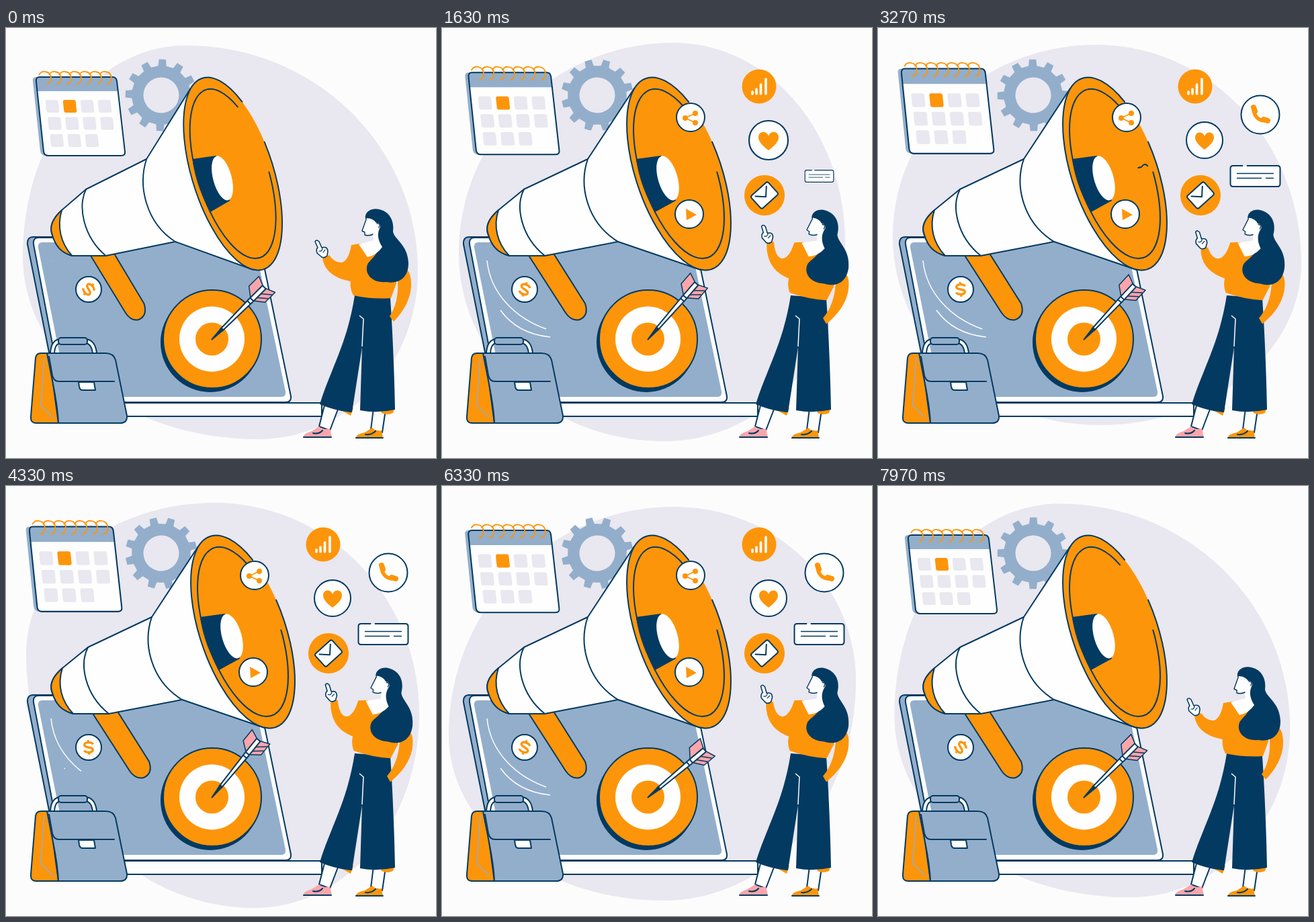
An HTML page for the animation above (8.01 s loop, 640 px wide and 640 px high).

```html
<!DOCTYPE html>
<html lang="en">
<head>
<meta charset="utf-8">
<title>Marketing loop</title>
<style>
html, body { margin: 0; width: 100%; height: 100%; overflow: hidden; background: #fcfcfc; }
svg { display: block; width: 100vw; height: 100vh; }
.o { fill: #fd950a; } .g { fill: #93aecb; } .w { fill: #fefefe; }
.d { fill: #033a61; } .b { fill: #e9e7ef; } .p { fill: #fba5ab; }
.s { stroke: #033a61; stroke-width: 2; stroke-linejoin: round; stroke-linecap: round; }
.so { stroke: #fd950a; stroke-width: 1.8; } .sw { stroke: #fefefe; stroke-width: 1.5; }
.n { fill: none; }
</style>
</head>
<body>
<svg id="stage" viewBox="0 0 640 640"></svg>
<script>
const LOOP = 8.01;
const path = (cls, d, more = '') => `<path class="${cls}" d="${d}" ${more}/>`;
const disc = (cls, x, y, r) => `<circle class="${cls}" cx="${x}" cy="${y}" r="${r}"/>`;
const group = (id, body) => `<g id="${id}">${body}</g>`;
const range = (n, f) => Array.from({ length: n }, (_, i) => f(i)).join('');

// Arc of the tilted megaphone mouth, angles in degrees
function mouthArc(rx, ry, from, to) {
  const tilt = -19 * Math.PI / 180;
  const at = a => {
    const x = rx * Math.cos(a * Math.PI / 180), y = ry * Math.sin(a * Math.PI / 180);
    return (352.5 + x * Math.cos(tilt) - y * Math.sin(tilt)) + ' ' + (217 + x * Math.sin(tilt) + y * Math.cos(tilt));
  };
  return `M${at(from)}A${rx} ${ry} -19 ${to - from > 180 ? 1 : 0} 1 ${at(to)}`;
}

function gearPath() {
  const pts = [];
  for (let i = 0; i < 12; i++)
    for (const [da, r] of [[-8, 44], [-5.5, 53.5], [5.5, 53.5], [8, 44]]) {
      const a = (i * 30 - 88 + da) * Math.PI / 180;
      pts.push((r * Math.cos(a)).toFixed(1) + ' ' + (r * Math.sin(a)).toFixed(1));
    }
  return 'M' + pts.join('L') + 'ZM26.5 0A26.5 26.5 0 1 0 -26.5 0A26.5 26.5 0 1 0 26.5 0Z';
}

const page = 'M50 73H159Q164 73 165 79L177 184Q178 190 171 190H63Q57 190 56 184L45 80Q44 73 50 73Z';
const calendar =
  path('g', 'M45 73Q39 73 40 79L51 183Q52 190 59 190H80V73Z') +
  path('w', page) +
  path('g', 'M50 73H159Q164 73 165 79L167 94H47L45 80Q44 73 50 73Z') +
  path('s n', page) +
  range(7, i => path('so n', `M${49 + 15 * i} 70q3 -6 9 -5q9 1 9 10q0 7 -7 9`)) +
  range(11, i => {
    const row = i >> 2, col = i & 3;
    return `<rect class="${i === 1 ? 'o' : 'b'}" x="-9.5" y="-9.5" width="19" height="19" rx="3"
      transform="translate(${69 + 26 * col + 3.4 * row} ${116.5 + 25.5 * row}) skewX(6)"/>`;
  });

const laptop =
  path('g s', 'M41 311Q31 311 32 322L77 548Q79 557 88 557H120V311Z') +
  path('w s', 'M48 312H366Q375 312 377 320L424 548Q425 557 416 557H94Q86 557 84 549L41 322Q40 312 48 312Z') +
  path('g', 'M54 319H362Q369 319 371 327L416 541Q417 549 409 549H100Q93 549 91 542L48 327Q47 319 54 319Z') +
  path('w s', 'M150 558H470V578H150Z');

const megaphone =
  path('o s', 'M128 337L184 424Q193 437 205 434Q219 428 213 410L165 334Z') +
  path('w s', 'M286 90L217 195L122 240L84 271C70 283 64 296 69 308C74 324 82 334 100 339L153 339L262 318L385 360L352 217Z') +
  path('o s', 'M84 271C70 283 64 296 69 308C74 324 82 334 100 339C82 320 76 295 84 271Z') +
  path('s n', 'M122 240C109 265 117 310 153 339M217 195C203 235 216 290 262 318') +
  '<ellipse class="o" cx="352.5" cy="217" rx="63.5" ry="150.2" transform="rotate(-19 352.5 217)"/>' +
  path('s n', mouthArc(63.5, 150.2, -11, 320)) +
  path('s n', mouthArc(55, 132, 7, 316)) +
  path('d', 'M289 195L326 190L348 257L317 274C302 248 292 220 289 195Z') +
  '<ellipse class="w" cx="336" cy="223.5" rx="14.5" ry="34" transform="rotate(-16 336 223.5)"/>';

const target =
  disc('d', 304, 468, 74) + disc('o s', 307, 463, 73) +
  disc('w', 306.5, 463, 48.5) + disc('o', 306.5, 463, 24.5);

const arrow =
  path('p s', 'M82 0L95 -17L116 -17L109 0L116 17L95 17Z', 'style="stroke-width:1.5"') +
  path('s n', 'M90 2L102 16M98 2L110 16', 'style="stroke-width:1.5"') +
  path('w s', 'M20 -2L82 -3.5H110V3.5H82L20 2Z') +
  path('d s', 'M0 0L22 -2V2Z') + path('s n', 'M78 -3V3M84 -3V3');

const strap = 'M69 484Q70 466 82 466H117Q130 466 132 484';
const briefcase =
  path('s n', strap, 'style="stroke-width:8"') +
  path('n', strap, 'stroke="#fefefe" stroke-width="4"') +
  '<rect class="g s" x="78" y="461" width="43" height="10" rx="4"/>' +
  path('o s', 'M52 484Q45 484 44 491L37 578Q36 588 45 588H78L64 484Z') +
  path('n', 'M57 490L52 562L70 580', 'stroke="#93aecb" stroke-width="1.5"') +
  path('g s', 'M61 484H148Q160 484 163 494L180 577Q181 588 170 588H78Q77 565 70 530Z') +
  path('s n', 'M64 489L69 517Q71 526 79 526H161') +
  path('w s', 'M108 527H131L133 539H114Q110 539 109 534Z');

const legs =
  path('w s', 'M475 558L466 593L482 599L495 565Z') + path('w s', 'M547 566L543 598L560 602L565 568Z') +
  path('p', 'M442 609Q444 603 455 600L466 593Q472 599 482 596L485 609Z') +
  path('o', 'M520 610Q522 604 534 602L545 595Q551 601 559 599L561 610Z') +
  path('s n', 'M443 609H484M521 610H561M457 603Q466 605 471 599M535 605Q544 606 550 600') +
  path('o', 'M490 564L513 577L517 565ZM556 565L579 564L576 573Q567 577 559 573Z') +
  path('d', 'M519 398L572 402C576 460 578 520 579 568Q552 574 527 569L530 475L515 572Q490 570 467 560C482 510 508 470 519 398Z') +
  path('sw n', 'M526 428L532 433L530 474');

const torso =
  path('o', 'M580 358Q604 350 603 385Q601 412 577 437L571 429Q585 408 583 376Z') +
  path('o', 'M514 323L526 321L562 324L580 345L581 380L573 402Q545 404 517 398Q510 386 514 370Z') +
  path('o', '', 'id="arm"') +
  path('d', 'M535 284C533 273 545 267 556 270C573 274 578 290 576 303C578 315 598 322 599 350C599 374 582 381 566 378C545 380 533 366 538 352C543 343 555 338 553 322L552 291Q542 290 535 284Z') +
  path('w', 'M537 283L530 302L534 304V308Q540 310 546 307L547 316L525 322L538 341Q552 338 560 326C553 315 552 306 557 296Q557 289 551 290Q546 283 537 283Z') +
  path('s n', 'M536 285L530 302L534 304V308Q540 310 546 307M552 291Q558 290 555 297', 'style="stroke-width:1.4"') +
  group('hand', path('w s', 'M470 341L463 335Q461 329 464 327L460 318Q462 314 466 318L470 327Q478 324 479 332L478 339Q474 343 470 341Z', 'style="stroke-width:1.6"') +
    path('s n', 'M466 332Q471 333 471 327M472 334L475 330', 'style="stroke-width:1.2"'));

// Icons are drawn around their own centre: x, y, start time, pop duration, body
const icons = [
  [472, 87, 1, .5, disc('o', 0, 0, 25.5) +
    path('n', 'M-10 8V11M-4 4V11M2.5 -3V11M10 -11V11', 'stroke="#fefefe" stroke-width="3.6" stroke-linecap="round"')],
  [486, 167, 1.2, .6, disc('w s', 0, 0, 27) +
    path('o', 'M0 14C-8 8 -14 2 -14 -4C-14 -13 -3 -14 0 -6C3 -14 14 -13 14 -4C14 2 8 8 0 14Z')],
  [480, 249, .98, .5, disc('o', 0, 0, 30) +
    '<g transform="rotate(-42)"><rect class="w s" x="-17" y="-12.5" width="34" height="25" rx="3"/>' +
    path('s n', 'M-11 -8L0 3L11 -8') + '</g>'],
  [561.5, 220.5, 1.54, .6, path('w', 'M-37 -15.5H37V15.5H-37Z') +
    path('s n', 'M-12 -15.5H33Q37 -15.5 37 -11.5V11.5Q37 15.5 33 15.5H-33Q-37 15.5 -37 11.5V-11.5Q-37 -15.5 -33 -15.5H-19') +
    path('s n', 'M-27 -4H27M-27 3H9M16 3H27', 'style="stroke-width:1.4"')],
  [569, 129, 1.75, .6, disc('w s', 0, 0, 28.5) +
    path('n', 'M-10 -10C-10 3 -2 10 10 9', 'stroke="#fd950a" stroke-width="5.5"') +
    path('n', 'M-10 -11L-8 -5M5 7L11 9', 'stroke="#fd950a" stroke-width="8" stroke-linecap="round"')],
  [370, 133, 0, 0, disc('w s', 0, 0, 21) + path('so n', 'M7 -6L-8 1L7 8') +
    disc('o', 7, -6, 4) + disc('o', -8, 1, 4) + disc('o', 7, 8, 4)],
  [368, 277, 0, 0, disc('w s', 0, 0, 21) + path('o', 'M-5 -8L11 1L-4 9Z')]
];

const ray = (id, cls, d) => path(cls + ' n', d, `id="${id}" pathLength="1" style="stroke-linecap:butt"`);

const stage = document.getElementById('stage');
stage.innerHTML =
  path('b', '', 'id="blob"') + path('g', gearPath(), 'id="gear" fill-rule="evenodd"') +
  group('calendar', calendar) + laptop +
  ray('arc1', 'sw', 'M67 346C72 396 110 432 155 448') + ray('arc2', 'sw', 'M87 420Q112 455 161 460') +
  disc('w s', 123, 389, 19) +
  group('coin', path('n', 'M7 -4C5 -8 -6 -9 -6 -4C-6 1 6 -1 6 4C6 9 -5 8 -7 4M0 -7V-11M0 7V11', 'stroke="#fd950a" stroke-width="3.4"')) +
  group('megaphone', megaphone) + target + group('arrow', arrow) + briefcase +
  ray('ray1', 's', 'M357 198L398 168Q406 161 414 168Q424 178 438 170') +
  ray('ray2', 's', 'M367 214Q370 208 375 211L392 207Q397 200 401 205Q406 210 410 203L422 198') +
  ray('ray3', 'sw', 'M348 160L405 105') +
  legs + group('torso', torso) + icons.map((c, i) => group('icon' + i, c[4])).join('');

const el = {};
stage.querySelectorAll('[id]').forEach(e => el[e.id] = e);

const clamp = x => Math.max(0, Math.min(1, x));
const smooth = x => (1 - Math.cos(Math.PI * clamp(x))) / 2;
const back = x => x <= 0 ? 0 : x >= 1 ? 1 : 1 + 2.70158 * (x - 1) ** 3 + 1.70158 * (x - 1) ** 2;
// Rises over the first span and falls over the last one
const swell = (t, rise, fall, end) => smooth(t / rise) * (1 - smooth((t - fall) / (end - fall)));

// Smooth curve through rows of [time, ...values]
function spline(keys, t) {
  let i = 0;
  while (i < keys.length - 2 && t > keys[i + 1][0]) i++;
  const a = keys[i], b = keys[i + 1], p = keys[i - 1] || a, n = keys[i + 2] || b;
  const h = b[0] - a[0], u = clamp((t - a[0]) / h);
  return a.slice(1).map((v, k) => {
    const w = b[k + 1];
    const m0 = h * (w - p[k + 1]) / (b[0] - p[0]), m1 = h * (n[k + 1] - v) / (n[0] - a[0]);
    return v + u * (m0 + u * (3 * (w - v) - 2 * m0 - m1 + u * (2 * (v - w) + m0 + m1)));
  });
}

// Blob extremes: time, then x and y of top, right, bottom, left
const rest = [268, 26, 613, 362, 375, 612, 25, 340];
const blobKeys = [
  [0, ...rest],
  [.9, 335, 4, 591, 325, 325, 616, 22, 308],
  [1.63, 345, 22, 600, 320, 330, 615, 25, 335],
  [2.5, 340, 23, 631, 340, 330, 604, 23, 320],
  [3.27, 325, 25, 630, 350, 330, 591, 22, 310],
  [4.33, 310, 25, 615, 340, 370, 628, 30, 250],
  [5, 320, 27, 615, 330, 360, 637, 27, 300],
  [6.33, 345, 31, 616, 290, 330, 617, 10, 370],
  [6.7, 335, 34, 619, 305, 340, 618, 5, 370],
  [LOOP, ...rest]
];
const arrowKeys = [[0, 0], [.97, -6.5], [1.63, -4], [3.27, -2], [4.33, -6], [6.33, 5], [LOOP, 0]];
const handKeys = [[0, 0], [.97, 0], [1.63, 1], [3.27, .3], [4.33, .95], [6.33, .75], [7.4, 0], [LOOP, 0]];

function blobPath([tx, ty, rx, ry, bx, by, lx, ly]) {
  const k = .555, mix = (a, b) => a + (b - a) * k;
  return `M${tx} ${ty}C${mix(tx, rx)} ${ty} ${rx} ${mix(ry, ty)} ${rx} ${ry}` +
    `C${rx} ${mix(ry, by)} ${mix(bx, rx)} ${by} ${bx} ${by}` +
    `C${mix(bx, lx)} ${by} ${lx} ${mix(ly, by)} ${lx} ${ly}` +
    `C${lx} ${mix(ly, ty)} ${mix(tx, lx)} ${ty} ${tx} ${ty}Z`;
}

const move = (id, value) => el[id].setAttribute('transform', value);

// Shows only the part of a line between two fractions
function trim(id, tail, head) {
  tail = clamp(tail); head = clamp(head);
  el[id].style.display = head - tail > .001 ? '' : 'none';
  el[id].setAttribute('stroke-dasharray', `0 ${tail} ${head - tail} 2`);
}

function draw(t) {
  el.blob.setAttribute('d', blobPath(spline(blobKeys, t)));
  move('gear', `translate(231 100) rotate(${360 * t / LOOP})`);

  const sway = swell(t, 3.1, 4.9, LOOP);
  move('calendar', `matrix(${1 + .04 * sway} 0 0 ${1 + .08 * sway} ${-11.8 * sway} ${-18.3 * sway})`);
  move('coin', `translate(123 389) rotate(${42 - 47 * sway})`);

  const scale = .948 + .052 * smooth(t / .6);
  move('megaphone', `translate(67 0) scale(${scale} 1) translate(-67 0)`);
  move('arrow', `translate(306.5 463.5) rotate(${-45 + spline(arrowKeys, t)[0]})`);

  const half = t % (LOOP / 2), gone = (half - 3.4) / .5;
  trim('arc1', gone, half / .5);
  trim('arc2', gone, (half - .32) / .4);

  trim('ray1', (t - 1) / .45, (t - .5) / .45);
  trim('ray3', (t - 1) / .45, (t - .5) / .45);
  const start = t < 2 ? .93 : 3.05;
  trim('ray2', (t - start - .1) / .35, (t - start) / .35);

  move('torso', `rotate(${7.5 * swell(t, .9, 7, 7.9)} 548 400)`);
  const lift = spline(handKeys, t)[0], hx = 2.5 * lift, hy = -12.5 * lift;
  move('hand', `translate(${hx} ${hy})`);
  el.arm.setAttribute('d', `M${471 + hx} ${343 + hy}L${481 + hx} ${338 + hy}Q489 350 500 349Q510 346 514 323L530 350L518 378Q${476 + hx} 372 ${471 + hx} ${343 + hy}Z`);

  const leave = 1 - smooth((t - 7.2) / .45);
  icons.forEach(([x, y, from, time], i) => {
    const id = 'icon' + i;
    let size = leave, shown = leave;
    if (time) size *= back((t - from) / time);
    else {
      const p = clamp((t - .7) / .5), away = 1 - p;
      x -= 13 * away; y += (i === 5 ? 2 : 15) * away;
      shown *= p;
    }
    move(id, `translate(${x} ${y}) scale(${size})`);
    el[id].style.opacity = shown;
  });
}

function tick() {
  draw(performance.now() / 1000 % LOOP);
  requestAnimationFrame(tick);
}
tick();
</script>
</body>
</html>
```
